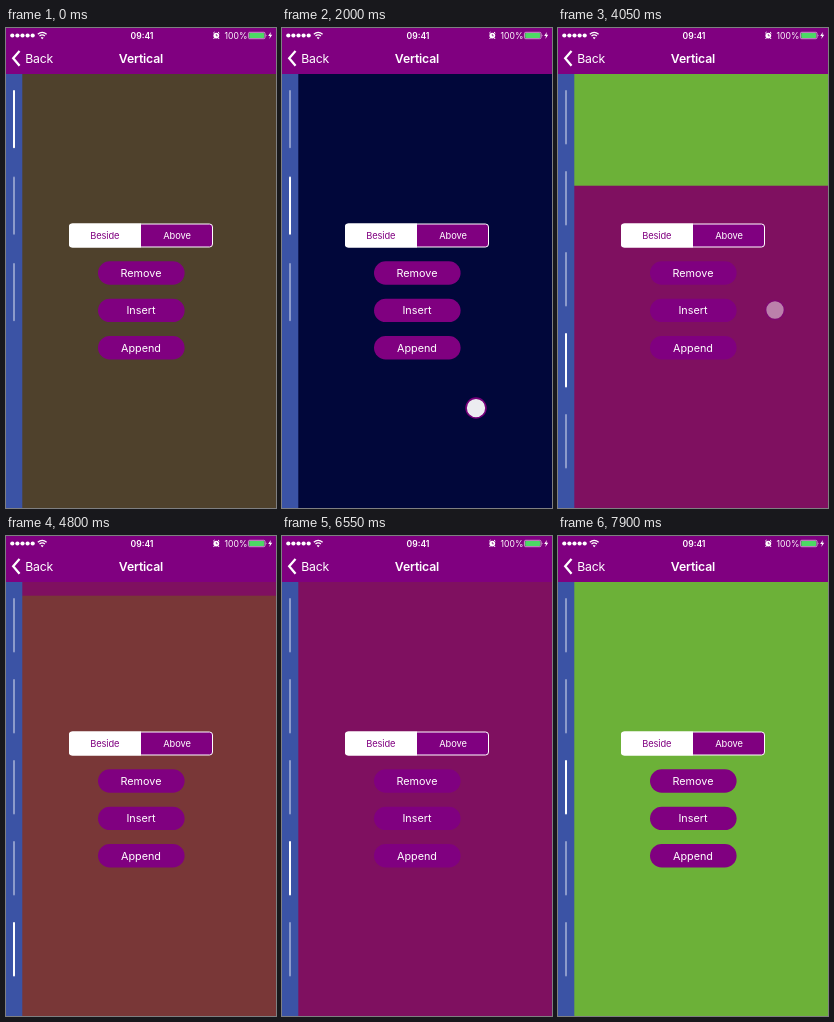
Write an HTML page that moves like this. It is 270 px wide and 480 px high and loops after 8000 ms.

```html
<!DOCTYPE html>
<html lang="en">
<head>
<meta charset="utf-8">
<title>Vertical</title>
<style>
html, body { margin: 0; width: 100%; height: 100%; overflow: hidden; background: #800080; }
svg { display: block; width: 100vw; height: 100vh; }
text { font-family: Inter, Roboto, "Liberation Sans", sans-serif; fill: #fff; }
.mid { text-anchor: middle; }
.status { font-size: 8.6px; }
.nav { font-size: 12.24px; letter-spacing: -.15px; }
.bold { font-weight: 600; }
.seg { font-size: 9.3px; letter-spacing: -.08px; }
.btn { font-size: 10.8px; }
</style>
</head>
<body>
<svg viewBox="0 0 270 480" preserveAspectRatio="none">
  <g id="pages"></g>
  <rect y="46" width="16.3" height="434" fill="#3b53a5"/>
  <g id="bars" fill="#fff"></g>

  <rect width="270" height="46" fill="#800080"/>
  <g id="dots" fill="#fff"></g>
  <g fill="none" stroke="#fff" stroke-width="1.3">
    <path d="M31.8 6.3Q36.2 2.5 40.6 6.3M33.5 8.1Q36.2 5.8 38.9 8.1"/>
    <path d="M35.2 9.3L36.2 10.3L37.2 9.3" stroke-width="1.2"/>
    <path d="M12.8 23.8L7.2 30.3L12.8 36.8" stroke-width="2.3" stroke-linecap="square"/>
  </g>
  <text class="status bold mid" x="136" y="10.6">09:41</text>
  <circle cx="210.3" cy="7.6" r="2.9" fill="#fff"/>
  <path d="M207.2 5.2L208.6 4M213.4 5.2L212 4M208.3 10L207.5 11M212.3 10L213.1 11" stroke="#fff"/>
  <path d="M210.3 6V7.8H211.8" fill="none" stroke="#800080" stroke-width=".7"/>
  <text class="status" x="218.6" y="10.6">100%</text>
  <rect x="242.4" y="4.3" width="16.6" height="6.4" rx="1.3" fill="none" stroke="#fff" stroke-width=".6"/>
  <rect x="243.2" y="5.1" width="15" height="4.8" rx=".7" fill="#4cd964"/>
  <path d="M259.8 6.3q1.3 1.2 0 2.4z" fill="#fff"/>
  <path d="M264.8 4L262.2 8H264L263.3 11L266.2 6.8H264.4Z" fill="#fff"/>
  <text class="nav" x="19.2" y="34.7">Back</text>
  <text class="nav bold mid" x="135" y="34.7">Vertical</text>

  <rect x="63.5" y="196" width="143" height="23" rx="3" fill="#800080" stroke="#fff"/>
  <path d="M135 195.5H66Q63 195.5 63 198.5V216.5Q63 219.5 66 219.5H135Z" fill="#fff"/>
  <text class="seg mid" x="98.8" y="210.8" style="fill:#800080">Beside</text>
  <text class="seg mid" x="171" y="210.8">Above</text>
  <g id="buttons"></g>
  <circle id="touch" fill="#fff" stroke="#800080" stroke-width="1.6" opacity="0"/>
</svg>
<script>
const LOOP = 8000, TOP = 46, PAGE = 434;
const COLORS = ['#4f412c', '#01073a', '#6cb138', '#7f1060', '#793737'];

// start time, direction, tempo, finger path
const SWIPES = [
  { at: 930, dir: 1, tempo: 1.3, from: [196, 380], to: [206, 282] },
  { at: 1950, dir: 1, tempo: 1.2, from: [194, 380], to: [206, 282] },
  { at: 3900, dir: 1, tempo: 1, from: [205, 380], to: [217, 282] },
  { at: 4500, dir: 1, tempo: 1, from: [205, 380], to: [217, 282] },
  { at: 6100, dir: -1, tempo: 1, from: [212, 282], to: [206, 380] },
  { at: 7050, dir: -1, tempo: 1.1, from: [212, 282], to: [206, 380] }
];
const TAPS = [{ at: 2800, adds: 2900 }, { at: 3250, adds: 3350 }];
const TAP_POINT = [150, 317];
// time since touch down, share of a page scrolled
const GLIDE = [[0, 0], [50, 0], [100, .3], [150, .74], [200, .87], [250, .935], [300, .968], [350, .99], [400, 1]];
const DRAG = [[0, 0], [50, 0], [115, 1]];
const SWIPE_ALPHA = [[0, .5], [50, 1], [110, 1], [150, .48], [200, 0]];
const TAP_ALPHA = [[0, .5], [50, 1], [100, 1], [200, .07], [250, 0]];

const $ = id => document.getElementById(id);
function add(parent, tag, attrs, text) {
  const el = document.createElementNS('http://www.w3.org/2000/svg', tag);
  for (const k in attrs) el.setAttribute(k, attrs[k]);
  if (text) el.textContent = text;
  return $(parent).appendChild(el);
}
function set(el, attrs) {
  for (const k in attrs) el.setAttribute(k, attrs[k]);
}
function sample(steps, t) {
  if (t <= steps[0][0]) return steps[0][1];
  for (let i = 1; i < steps.length; i++) {
    const [t0, v0] = steps[i - 1], [t1, v1] = steps[i];
    if (t <= t1) return v0 + (v1 - v0) * (t - t0) / (t1 - t0);
  }
  return steps[steps.length - 1][1];
}

COLORS.forEach((fill, i) =>
  add('pages', 'rect', { y: TOP + i * PAGE, width: 270, height: PAGE + .5, fill }));
const bars = COLORS.map(() => add('bars', 'rect', { x: 7, width: 2, rx: 1 }));
for (let i = 0; i < 5; i++) add('dots', 'circle', { cx: 6.3 + i * 5.1, cy: 7.5, r: 2.1 });
['Remove', 'Insert', 'Append'].forEach((label, i) => {
  const y = 233.3 + i * 37.4;
  add('buttons', 'rect', { x: 92, y, width: 86.6, height: 23.4, rx: 11.7, fill: '#800080' });
  add('buttons', 'text', { class: 'btn mid', x: 135, y: y + 15.5 }, label);
});

function draw(t) {
  let pos = 0, finger = TAP_POINT, alpha = 0;
  for (const s of SWIPES) {
    const dt = (t - s.at) / s.tempo;
    if (dt < 0) continue;
    pos += s.dir * sample(GLIDE, dt);
    const a = sample(SWIPE_ALPHA, dt);
    if (a > 0) {
      const k = sample(DRAG, dt);
      finger = s.from.map((v, i) => v + (s.to[i] - v) * k);
      alpha = a;
    }
  }
  let count = 3;
  for (const tap of TAPS) {
    if (t >= tap.adds) count++;
    if (t >= tap.at) alpha = Math.max(alpha, sample(TAP_ALPHA, t - tap.at));
  }

  $('pages').setAttribute('transform', `translate(0 ${-pos * PAGE})`);
  const pitch = count > 4 ? 81 : 86.5, height = count > 4 ? 54.5 : 58.3;
  const active = Math.round(pos);
  bars.forEach((bar, i) => set(bar, {
    y: 62 + i * pitch, height,
    opacity: i >= count ? 0 : i === active ? 1 : .42
  }));
  set($('touch'), { cx: finger[0], cy: finger[1], r: 9 + alpha, opacity: alpha });
}

const begin = performance.now();
function tick() {
  draw((performance.now() - begin) % LOOP);
  requestAnimationFrame(tick);
}
draw(0);
requestAnimationFrame(tick);
</script>
</body>
</html>
```
